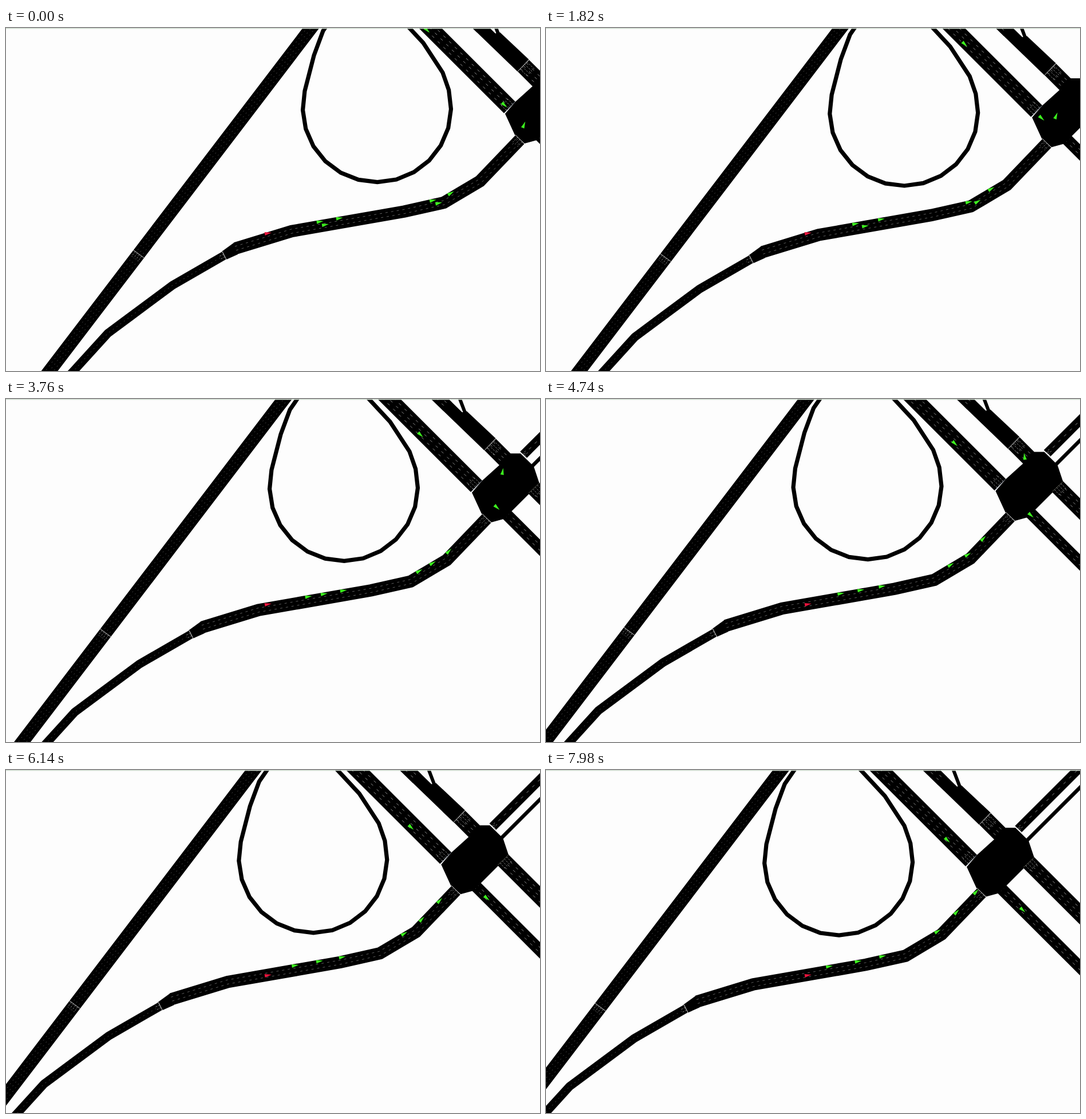
Recreate the animation shown at these times as an HTML page. Size 933x600 px, loop 8000 ms.

```html
<!DOCTYPE html>
<html lang="en">
<head>
<meta charset="utf-8">
<title>Traffic simulation</title>
<style>
  html, body { margin: 0; width: 100%; height: 100%; overflow: hidden; background: #fdfdfd; }
  svg { display: block; width: 100vw; height: 100vh; }
  .road { fill: none; stroke: #000; }
  .lane { fill: none; stroke-width: .8; }
</style>
</head>
<body>
<svg viewBox="0 0 933 600">
  <g id="world"><g id="map"></g><g id="cars"></g></g>
  <rect width="933" height="1.4" fill="#cfdccf"/>
</svg>
<script>
const LOOP = 8000, STEP = 680, PHASE = 50;
const world = document.getElementById('world');
const map = document.getElementById('map');
const carLayer = document.getElementById('cars');

function add(parent, tag, attrs) {
  const el = document.createElementNS('http://www.w3.org/2000/svg', tag);
  for (const name in attrs) el.setAttribute(name, attrs[name]);
  return parent.appendChild(el);
}

// Point and direction at a distance along a polyline, `left` of its centre.
function along(points, distance, left = 0) {
  for (let i = 1; ; i++) {
    const [x, y] = points[i - 1];
    const dx = points[i][0] - x, dy = points[i][1] - y, len = Math.hypot(dx, dy);
    if (distance <= len || i === points.length - 1) {
      const ux = dx / len, uy = dy / len;
      return [x + ux * distance + uy * left, y + uy * distance - ux * left,
        Math.atan2(dy, dx) * 180 / Math.PI];
    }
    distance -= len;
  }
}

// Moves a polyline sideways, mitring its corners.
function shift(points, offset) {
  const last = points.length - 1;
  const normal = i => {
    const [a, b] = [points[i], points[i + 1]];
    const dx = b[0] - a[0], dy = b[1] - a[1], len = Math.hypot(dx, dy);
    return [-dy / len, dx / len];
  };
  return points.map(([x, y], i) => {
    const before = normal(Math.max(i - 1, 0)), after = normal(Math.min(i, last - 1));
    const nx = before[0] + after[0], ny = before[1] + after[1];
    const k = 2 * offset / (nx * nx + ny * ny);
    return [x + nx * k, y + ny * k];
  });
}

function road(points, width, lanes = 1, color = '#5c5c5c', dash = '2 6') {
  add(map, 'polyline', { class: 'road', points: points.join(' '), 'stroke-width': width });
  for (let i = 1; i < lanes; i++) {
    add(map, 'polyline', {
      class: 'lane', points: shift(points, width * (i / lanes - .5)).join(' '),
      stroke: color, 'stroke-dasharray': dash
    });
  }
}

// Streets of the grid all run at 45 degrees; `rise` is 1 downwards, -1 upwards.
const street = (x, y, run, rise, width, lanes) =>
  road([[x, y], [x + run, y + run * rise]], width, lanes, '#b4b4b4', '5 9');

const area = points => add(map, 'polygon', { points: points.join(' ') });

// Stop line with short lane marks on one side.
function gate(x, y, dx, dy, depth, lanes, color = '#fff') {
  const len = Math.hypot(dx, dy);
  const line = (x1, y1, vx, vy, attrs) =>
    add(map, 'line', { class: 'lane', x1, y1, x2: x1 + vx, y2: y1 + vy, ...attrs });
  for (let i = 1; i < lanes; i++) {
    line(x + dx * i / lanes, y + dy * i / lanes, -dy / len * depth, dx / len * depth,
      { stroke: '#aaa', 'stroke-dasharray': '3 2' });
  }
  line(x, y, dx, dy, { stroke: color, 'stroke-width': 1 });
}

const highway = [[556, -30], [533, 0], [76, 600], [38, 650]];
const slip = [[72, 650], [118, 600], [178, 534], [291, 450], [381, 398]];
const ramp = [[401, 385.5], [499, 355.5], [696, 321], [765, 305.5], [828, 268], [898, 195]];

// The turning loop is an arc of even chords with two tails.
const arc = Array.from({ length: 15 }, (_, i) => {
  const a = (14.8 * i - 14) * Math.PI / 180;
  return [648 + 129.5 * Math.cos(a), 140 + 129.5 * Math.sin(a)];
});
const loop = [[677, -30], [729, 26], [763, 78], ...arc, [538, 48], [554, 5], [578, -30]];

road(highway, 23, 4);
road(slip, 15, 2);
area([[377, 391], [399, 375], [405, 396], [385, 405]]);
road(ramp, 21.5, 3, '#777', '4 6');
road(loop, 7.2);
street(700, -41, 180, 1, 28.3, 4);
area([[776, -37.5], [807, -37.5], [855, 9.5], [863, 7.5], [914, 55.5], [894, 76.5]]);
street(792, -38, 38, 1, 21, 3);
road([[845, -30], [849, -19], [860, 10]], 6);
street(904, 66, 30, 1, 28.5, 4);
street(962, 84, 120, -1, 16, 2);
street(977, 104, 120, -1, 6.4, 1);
street(978, 140, 132, 1, 26.8, 4);
street(931, 186.5, 169, 1, 20.4, 3);
area([[940, 81.5], [957, 81.5], [980, 104], [990, 134], [928, 196], [906, 202], [889, 187],
  [872, 150], [890, 129], [921, 101]]);

gate(222, 388, 19, 14, 11, 5);
gate(378, 391, 7, 14, 10, 3);
gate(890, 187, 16, 16, 12, 4);
gate(871, 148, 18, -19, -13, 5, '#4a5668');
gate(894, 76, 20, -21, 20, 5);
gate(957, 80, 11, 9, -10, 3);
gate(971, 151, 19, -18, 13, 5, '#66665a');

// Cars keep a steady speed along a path; some move to the left lane at step 3.
const through = [[736, 4], [871, 135], [970, 225.5]];
const turn = [[905, 169], [924, 123], [926, 111.5], [922.5, 89]];
const LEFT = 8, MIDDLE = 1;
const cars = [
  { path: through, from: 0, speed: 12.95 },
  { path: through, from: 188, speed: 12.2 },
  { path: turn, from: 0, speed: 12, until: 7 },
  { path: ramp, from: 154.4, speed: 7.7, lane: LEFT },
  { path: ramp, from: 162.6, speed: 11.6, lane: MIDDLE },
  { path: ramp, from: 189, speed: 13.2, lane: LEFT },
  { path: ramp, from: 355.7, speed: 8, lane: LEFT },
  { path: ramp, from: 364.5, speed: 11.7, lane: MIDDLE },
  { path: ramp, from: 392.5, speed: 13.6, lane: LEFT }
];
const triangle = fill => add(carLayer, 'polygon', { points: '-6,-3 6,0 -6,3', fill });
for (const car of cars) car.el = triangle('#3cf01e');
const leader = triangle('#e8143c');

const pose = (el, x, y, angle) =>
  el.setAttribute('transform', `translate(${x} ${y}) rotate(${angle})`);

// Travel of the red car: it rounds the bend, then changes lane at step 6.
const travel = s => s < 6
  ? [11.25 * s + .07 * s * s, .16 * s * s - 3.55 * s]
  : [86.5 + 12.6 * (s - 7), -11 - 2.13 * (s - 7)];

// The simulation advances in whole steps while the view follows the red car.
function draw(now) {
  const step = Math.floor((now % LOOP + PHASE) / STEP);
  const [dx, dy] = travel(step);
  world.setAttribute('transform', `translate(${-dx} ${-dy})`);
  pose(leader, 458 + dx, 359 + dy, -10);
  for (const { el, path, from, speed, lane = 0, until = Infinity } of cars) {
    const left = lane === MIDDLE && step >= 3 ? LEFT : lane;
    pose(el, ...along(path, from + speed * step, left));
    el.setAttribute('visibility', step > until ? 'hidden' : 'visible');
  }
}

const start = performance.now();
function tick() {
  draw(performance.now() - start);
  requestAnimationFrame(tick);
}
tick();
</script>
</body>
</html>
```
